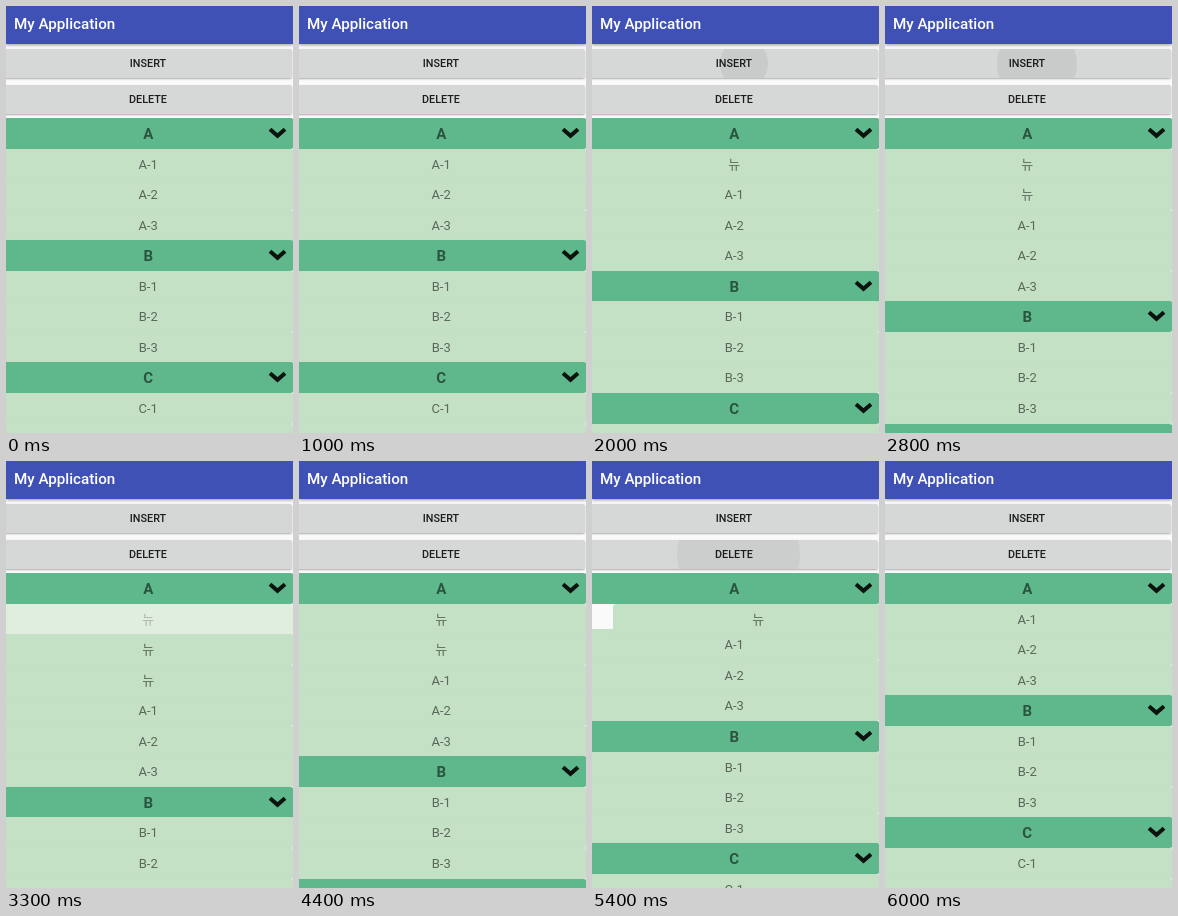
Write an HTML page that moves like this. It is 287 px wide and 427 px high and loops after 6100 ms.

```html
<!DOCTYPE html>
<html lang="en">
<head>
<meta charset="utf-8">
<title>Expandable list</title>
<style>
  html, body { margin: 0; width: 100%; height: 100%; overflow: hidden; background: #fafafa; }
  body { position: relative; font-family: Roboto, "Noto Sans CJK KR", "Noto Sans CJK", sans-serif; }
  .bar {
    position: absolute; left: 0; top: 0; width: 100%; height: 38px;
    background: #3f51b5; color: #fff; z-index: 2;
    font: 500 15.2px/36px Roboto, sans-serif; text-indent: 8px;
    box-shadow: 0 1px 3px rgba(0, 0, 0, .4);
  }
  .btn {
    position: absolute; left: -2px; width: 288px; height: 29px; border-radius: 2px;
    background: #d6d7d7; color: rgba(0, 0, 0, .87); overflow: hidden;
    font: 500 10.8px/29px Roboto, sans-serif; text-align: center;
  }
  .wrap { position: absolute; left: 0; width: 100%; height: 29px; }
  .wrap::before {
    content: ""; position: absolute; left: -2px; width: 288px; height: 29px;
    border-radius: 2px; box-shadow: 0 1px 2px rgba(0, 0, 0, .32);
  }
  .btn span { position: relative; }
  .ripple { position: absolute; border-radius: 50%; background: #000; opacity: 0; }
  .list { position: absolute; left: 0; top: 112px; width: 100%; bottom: 0; overflow: hidden; }
  .row {
    position: absolute; left: -3px; top: 0; width: 290.5px; height: 31px; border-radius: 4px;
    background: #c5e1c5; color: rgba(0, 0, 0, .54);
    font-size: 13px; line-height: 32px; text-align: center;
    box-shadow: 0 0 1px rgba(0, 0, 0, .1);
  }
  .head { background: #5eb88c; font-size: 15px; font-weight: 700; }
  .head svg { position: absolute; left: 264px; top: 7px; width: 21px; height: 16px; }
</style>
</head>
<body>
<div class="bar">My Application</div>
<div class="wrap" style="top:43px"><div class="btn"><i class="ripple"></i><span>INSERT</span></div></div>
<div class="wrap" style="top:79px"><div class="btn"><i class="ripple"></i><span>DELETE</span></div></div>
<div class="list"></div>
<script>
  const LOOP = 6100, TICK = 100, PITCH = 30.56;
  const MOVE = 250, FADE = 120, SLIDE = 350;
  // Each tap: finger down, then click
  const inserts = [[1060, 1133], [1975, 2060], [2712, 2992]];
  const deletes = [[3865, 3950], [4555, 4640], [5225, 5335]];
  const chevron = '<svg viewBox="0 0 21 16"><path d="M3 4.2L10.5 10.8 18 4.2" ' +
    'fill="none" stroke="#0b120e" stroke-width="4"/></svg>';

  const list = document.querySelector('.list');
  const [insertRipple, deleteRipple] = document.querySelectorAll('.ripple');

  function addRow(text, isHead) {
    const el = document.createElement('div');
    el.className = isHead ? 'row head' : 'row';
    el.textContent = text;
    if (isHead) el.innerHTML += chevron;
    list.append(el);
    return el;
  }

  const rows = [];
  for (const group of 'ABC') {
    rows.push(addRow(group, true));
    for (let i = 1; i <= 3; i++) rows.push(addRow(group + '-' + i));
  }
  // The newest row sits on top and is the first to be deleted
  const extras = inserts.map((tap, i) => ({
    el: addRow('뉴'), born: tap[1], gone: deletes[2 - i][1]
  }));

  const clamp = p => Math.min(1, Math.max(0, p));
  const ease = p => (1 - Math.cos(Math.PI * clamp(p))) / 2;

  function place(el, x, slot) {
    el.style.transform = `translate(${x}px, ${Math.round(slot * PITCH)}px)`;
  }

  function drawRipple(el, taps, t, cx) {
    const tap = taps.filter(([down]) => t >= down).pop();
    if (!tap) { el.style.opacity = 0; return; }
    const r = 18 + .25 * Math.min(t - tap[0], 600);
    el.style.left = cx + 2 - r + 'px';
    el.style.top = 14.5 - r + 'px';
    el.style.width = el.style.height = 2 * r + 'px';
    el.style.opacity = .06 * (1 - clamp((t - tap[1]) / 350));
  }

  function render(t) {
    let push = 0;
    for (const { el, born, gone } of [...extras].reverse()) {
      place(el, 290 * ease((t - gone) / SLIDE), 1 + push);
      el.style.opacity = ease((t - born - MOVE) / FADE);
      push += ease((t - born) / MOVE) - ease((t - gone) / MOVE);
    }
    rows.forEach((el, i) => place(el, 0, i ? i + push : 0));
    drawRipple(insertRipple, inserts, t, 152);
    drawRipple(deleteRipple, deletes, t, 146.5);
  }

  const start = performance.now();
  function frame() {
    const t = (performance.now() - start) % LOOP;
    render(Math.floor(t / TICK) * TICK);
    requestAnimationFrame(frame);
  }
  frame();
</script>
</body>
</html>
```
